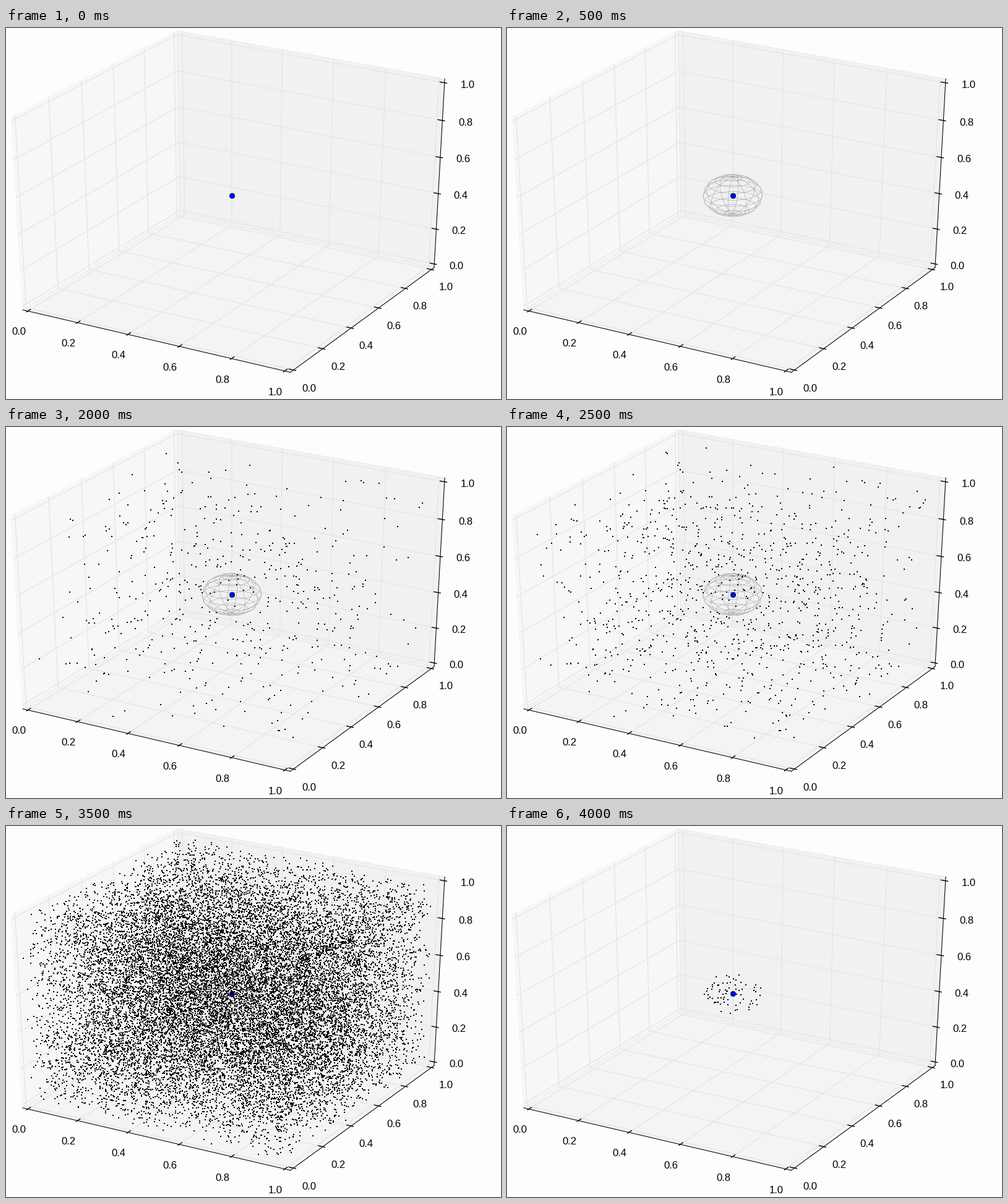
Recreate the animation shown at these times as a matplotlib script. Size 800 px wide and 600 px high, loop 6500 ms.

```python
import numpy as np
import matplotlib.pyplot as plt
from matplotlib.animation import FuncAnimation
from matplotlib.patches import Polygon

plt.rcParams["font.family"] = "Liberation Sans"

W, H, DPI = 800, 600, 100
CENTER = np.array([364.8, 270.8])
SCALE = np.array([4793, -3419])
DIST = 10
LO, HI = -1 / 48, 1 + 1 / 48          # pane limits, slightly outside 0..1
TICKS = np.linspace(0, 1, 6)
RADIUS = 0.1
# visible points at each step
COUNTS = [0, 0, 10, 200, 500, 1000, 10000, 20000]
STEPS, INTERVAL = 13, 500

elev, azim = np.radians(30), np.radians(-60)
RIGHT = np.array([-np.sin(azim), np.cos(azim), 0])
UP = np.array([-np.cos(azim) * np.sin(elev),
               -np.sin(azim) * np.sin(elev), np.cos(elev)])
TOWARD = np.array([np.cos(azim) * np.cos(elev),
                   np.sin(azim) * np.cos(elev), np.sin(elev)])


def depth(p):
    return DIST - (np.asarray(p) - 0.5) @ TOWARD


def project(p):
    """Perspective projection of unit-cube points to stage pixels."""
    d = np.asarray(p, float) - 0.5
    flat = np.stack([d @ RIGHT, d @ UP], axis=-1)
    return CENTER + SCALE * flat / depth(p)[..., None]


fig = plt.figure(figsize=(W / DPI, H / DPI), dpi=DPI, facecolor="#fdfdfd")
ax = fig.add_axes([0, 0, 1, 1])
ax.set_xlim(0, W)
ax.set_ylim(H, 0)
ax.axis("off")


def line(points, **style):
    x, y = project(points).T
    return ax.plot(x, y, **style)[0]


def pane(corners, gray):
    color = (gray, gray, gray, 0.5)
    ax.add_patch(Polygon(project(corners), facecolor=color,
                         edgecolor=color, lw=1, zorder=0))


def axis(start, end, place, tick_dir, label_shift):
    """Axis line with ticks and labels; place(t) is the tick's edge point."""
    line([start, end], color="k", lw=0.75, zorder=2)
    for t in TICKS:
        p = np.array(place(t))
        step = np.array(tick_dir) / 12
        line([p - 0.2 * step, p + 0.1 * step], color="k", lw=1, zorder=2)
        x, y = project(p) + np.array(label_shift) * DIST / depth(p)
        ax.text(x, y, f"{t:.1f}", size=12, ha="center", va="center")


pane([(LO, LO, LO), (LO, HI, LO), (LO, HI, HI), (LO, LO, HI)], 0.95)
pane([(LO, HI, LO), (HI, HI, LO), (HI, HI, HI), (LO, HI, HI)], 0.90)
pane([(LO, LO, LO), (HI, LO, LO), (HI, HI, LO), (LO, HI, LO)], 0.925)

for t in TICKS:
    for path in ([(t, LO, LO), (t, HI, LO), (t, HI, HI)],
                 [(HI, t, LO), (LO, t, LO), (LO, t, HI)],
                 [(LO, LO, t), (LO, HI, t), (HI, HI, t)]):
        line(path, color="#e6e6e6", lw=1, zorder=1)

axis((LO, LO, LO), (HI, LO, LO), lambda t: (t, LO, LO), (0, -1, 0), (-14.6, 33.8))
axis((HI, LO, LO), (HI, HI, LO), lambda t: (HI, t, LO), (1, 0, 0), (24.4, 29.6))
axis((HI, HI, LO), (HI, HI, HI), lambda t: (HI, HI, t), (1, 0, 0), (37.2, 3.6))


def on_sphere(u, v):
    u, v = np.broadcast_arrays(u, v)
    unit = np.stack([np.cos(u) * np.sin(v), np.sin(u) * np.sin(v), np.cos(v)], -1)
    return 0.5 + RADIUS * unit


around = np.linspace(0, 2 * np.pi, 100)
down = np.linspace(0, np.pi, 100)
wire_style = dict(color="gray", lw=0.27, zorder=3)
wires = [line(on_sphere(u, down), **wire_style) for u in around[::10]]
wires += [line(on_sphere(around, v), **wire_style) for v in down[10::10]]

ax.plot(*CENTER, "o", ms=6, mfc="blue", mec="k", mew=0.5, zorder=4)

rng = np.random.default_rng(7)
cloud = rng.random((COUNTS[-1], 3))
cloud[:10] = 0.2 + 0.6 * cloud[:10]   # the first few stay near the middle
pixels = np.round(project(cloud))
inside = np.linalg.norm(cloud - 0.5, axis=1) < RADIUS
dots, = ax.plot([], [], "s", ms=2 * 72 / DPI, mfc="k", mec="none", mew=0, zorder=5)


def update(i):
    sampling = i < len(COUNTS)
    shown = pixels[:COUNTS[i]] if sampling else pixels[inside]
    dots.set_data(shown[:, 0], shown[:, 1])
    for wire in wires:
        wire.set_visible(sampling and i > 0)
    return [dots, *wires]


anim = FuncAnimation(fig, update, frames=STEPS, interval=INTERVAL,
                     repeat=True, repeat_delay=0)
plt.show()
```
